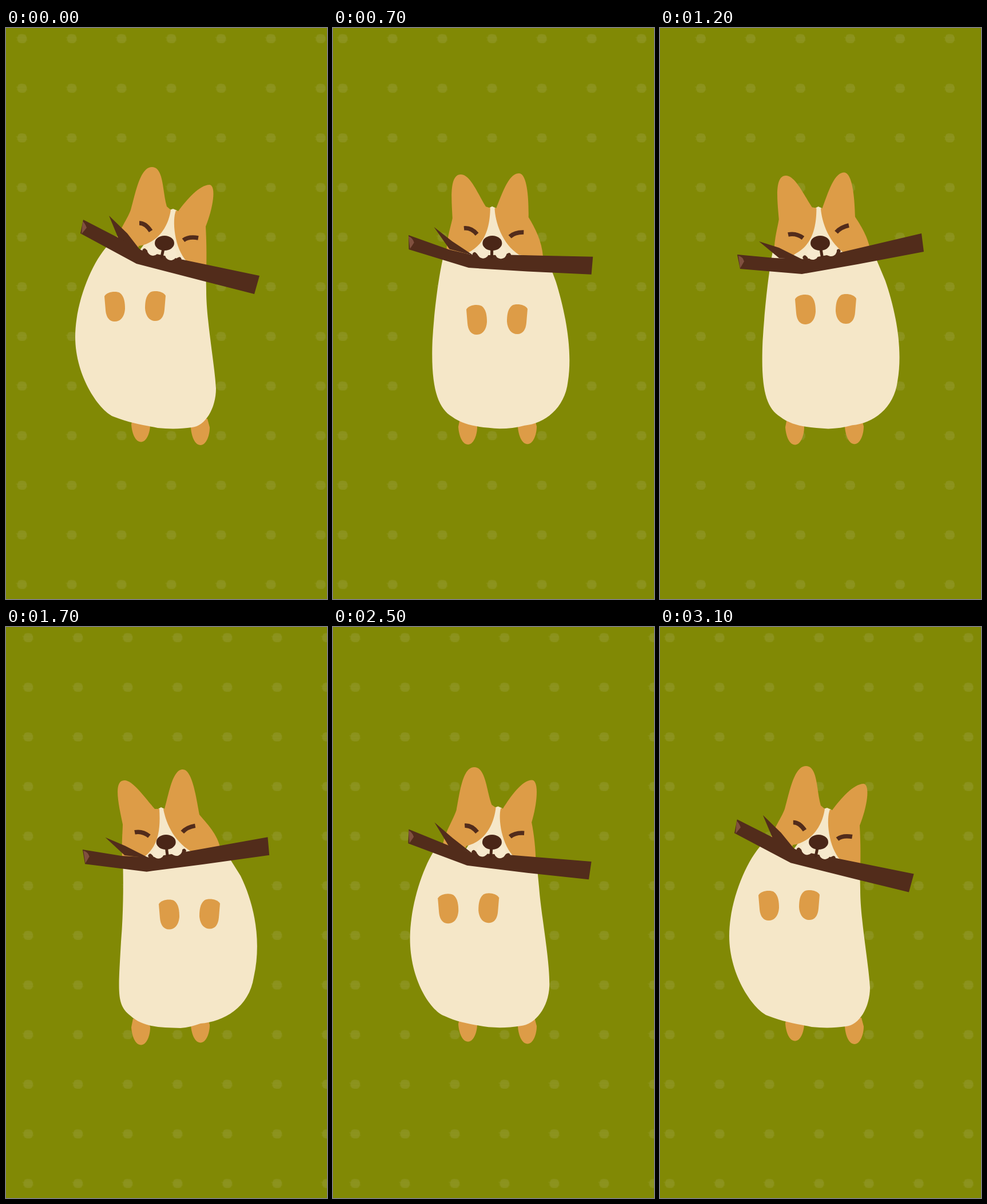
Write an HTML page that moves like this. It is 561 px wide and 998 px high and loops after 3.2 s.

```html
<!DOCTYPE html>
<html lang="en">
<head>
<meta charset="utf-8">
<title>Dancing dog</title>
<style>
  html, body { margin: 0; width: 100%; height: 100%; overflow: hidden; background: #818905; }
  svg { display: block; width: 100%; height: 100%; }
  .fur { fill: #dd9c47; }
  .cream { fill: #f5e7c8; }
  .bark { fill: #522c1b; }
  .line { fill: none; stroke: #522c1b; stroke-width: 7.5; stroke-linejoin: round; }
</style>
</head>
<body>
<svg viewBox="0 0 561 998">
  <defs>
    <pattern id="dots" width="87" height="86.73" patternUnits="userSpaceOnUse">
      <g fill="#8e9524">
        <path d="M37 37 C40 34 48 35 50 37 L52 43 L50 49 C47 52 39 51 37 49 L35 43Z" opacity=".75"/>
        <path d="M33 40h19v2h-19z M34 45h19v1.5h-19z" opacity=".4"/>
      </g>
    </pattern>
    <path id="paw" d="M-18 -18 C-14 -26 2 -28 9 -24 C17 -18 18 -6 18 4 C17 18 10 26 0 26 C-10 26 -15 18 -16 6Z"/>
    <path id="leg" d="M-14 -46 L-17 -31 C-16 -15 -10 0 0 0 C9 0 16 -15 16 -31 L12 -46Z"/>
  </defs>
  <rect width="561" height="998" fill="#818905"/>
  <rect width="561" height="998" fill="url(#dots)"/>
  <use id="legL" href="#leg" class="fur"/>
  <use id="legR" href="#leg" class="fur"/>
  <path id="body" class="cream"/>
  <use id="pawL" href="#paw" class="fur"/>
  <use id="pawR" href="#paw" class="fur"/>
  <g id="head">
    <path id="face" class="cream"/>
    <path id="earL" class="fur"/>
    <path id="earR" class="fur"/>
  </g>
  <path id="eyes" class="line"/>
  <path id="spike" class="bark"/>
  <path id="stick" class="bark"/>
  <path id="cut" fill="#80503f"/>
  <path id="corners" fill="none" stroke="#522c1b" stroke-width="7" stroke-linecap="round"/>
  <path id="jowls" fill="none" stroke="#f7e9cd" stroke-width="20" stroke-linecap="round"/>
  <path id="lip" fill="none" stroke="#4a2617" stroke-width="5" stroke-linecap="round"/>
  <ellipse id="nose" rx="17" ry="13" cy="376" fill="#4a2617"/>
</svg>
<script>
const LOOP = 3200, STEP = 100;
const $ = id => document.getElementById(id);

// Motion keys: sway of the body, tilt of face and stick, paw position
const times = [0, 700, 1200, 1700, 2200, 2800, 3100];
const sway = [0, .66, .73, 1, .35, .06, 0];
const tilt = [0, .45, 1, .89, .54, .1, .02];
const pawX = [190, 251, 254, 285, 212.5, 198, 190];
const pawY = [487, 510, 492, 502.5, 488, 497, 487];

// Poses at the extremes of sway
const swayPoses = {
  body: [
    'M178 380 C150 410 121 480 121 540 C121 610 165 672 190 680 C215 690 240 694 265 699 C285 701 305 701 325 698 C348 696 367 665 367 630 C365 590 350 510 350 460 L349 410Z',
    'M204 395 C205 430 206 490 201 550 C196 640 193 660 217 679 C240 700 270 700 305 701 C317 700 329 697 340 693 C380 690 425 665 433 612 C448 545 432 480 410 435 L388 400Z'],
  face: [
    'M286 318 L292 316 L299 319 L325 410 L225 400Z',
    'M266 318 L271 315 L277 318 L335 397 L222 407Z'],
  earL: [
    'M190 380 C192 362 212 335 218 318 C226 290 234 243 255 243 C276 243 273 285 281 312 L288 318 C283 351 263 376 232 381 L225 402Z',
    'M203 403 C202 375 204 355 204 345 C198 315 186 268 207 268 C222 268 244 300 260 318 L268 318 C270 350 268 385 238 404 L225 408Z'],
  earR: [
    'M297 319 C290 335 294 385 316 408 L350 423 C351 395 350 365 349 347 C362 315 368 276 356 274 C338 274 316 300 301 320Z',
    'M275 318 C280 345 295 378 330 396 L376 394 C372 365 355 348 338 328 C332 295 325 249 309 249 C291 249 285 290 277 318Z']
};

// Poses along tilt
const tiltPoses = {
  eyes: [
    'M233 341 Q244 341 253 355 M310 371 Q319 364 336 367',
    'M224 361 Q238 358 250 367 M308 357 Q316 348 330 345'],
  spike: [
    'M180 328 L199 374 L236 390 L212 359Z',
    'M176 350 L204 388 L246 398 L208 374Z',
    'M173 373 L208 402 L252 406 L208 384Z'],
  stick: [
    'M135 335 L195 366 L240 390 L300 403 L443 433 L434 465 L340 441 L228 412 L130 359Z',
    'M132 365 L203 389 L247 398 L306 396 L455 396 L453 427 L340 424 L238 420 L133 390Z',
    'M135 396 L200 402 L254 404 L308 394 L457 359 L461 391 L345 413 L248 430 L140 421Z'],
  cut: [
    'M134 338 Q138 341 141 349 L132 360Z',
    'M132 367 Q140 370 142 378 L135 389Z',
    'M137 398 Q145 400 147 408 L140 420Z'],
  corners: [
    'M242 389 L244 391 M303 404 L301 405',
    'M248 396 L250 398 M308 396 L306 397',
    'M253 401 L255 403 M312 390 L310 392'],
  jowls: [
    'M258 387 L257 388 M287 392 L288 396',
    'M264 390 L263 393 M293 391 L294 393',
    'M268 393 L267 395 M296 388 L299 389'],
  lip: [
    'M275 386 L272 400',
    'M278 386 L278 400',
    'M281 386 L283 398']
};

// Blends path numbers: linear for two poses, quadratic for three
function mix(poses, k) {
  const w = poses.length < 3 ? [1 - k, k]
    : [(1 - k) * (1 - 2 * k), 4 * k * (1 - k), k * (2 * k - 1)];
  const nums = poses.map(p => p.match(/\d+/g));
  let i = 0;
  return poses[0].replace(/\d+/g, () => {
    const v = w.reduce((sum, f, j) => sum + f * nums[j][i], 0);
    i++;
    return v.toFixed(2);
  });
}

// Smooth periodic curve through the keys
function curve(vals, t) {
  const n = times.length;
  const at = i => {
    const turn = Math.floor(i / n), j = i - turn * n;
    return [times[j] + turn * LOOP, vals[j]];
  };
  let i = n - 1;
  while (times[i] > t) i--;
  const slope = j => {
    const [ta, a] = at(j - 1), [tb, b] = at(j + 1);
    return (b - a) / (tb - ta);
  };
  const [t0, v0] = at(i), [t1, v1] = at(i + 1);
  const d = t1 - t0, u = (t - t0) / d, r = 1 - u;
  return v0 * r * r * (1 + 2 * u) + v1 * u * u * (3 - 2 * u)
    + d * u * r * (slope(i) * r - slope(i + 1) * u);
}

function place(id, x, y, extra = '') {
  $(id).setAttribute('transform', `translate(${x} ${y}) ${extra}`);
}

function draw(t) {
  const k = curve(sway, t), s = curve(tilt, t);
  const x = curve(pawX, t), y = curve(pawY, t);
  const shift = 28 - 43.5 + t * 4 * 87 / LOOP;
  $('dots').setAttribute('patternTransform', `translate(${shift % 87} ${19 - 43.4})`);
  for (const id in swayPoses) $(id).setAttribute('d', mix(swayPoses[id], k));
  for (const id in tiltPoses) $(id).setAttribute('d', mix(tiltPoses[id], s));
  place('head', 0, -16 * k * (1 - k));
  place('pawL', x, y);
  place('pawR', x + 71, y - 1, 'scale(-1 1)');
  place('legL', 236, 723.5 + 7 * k);
  place('legR', 340, 729 - 2.5 * k);
  $('nose').setAttribute('cx', 277 + 3 * s);
}

function frame() {
  const t = performance.now() % LOOP;
  draw(Math.floor(t / STEP) * STEP);
  requestAnimationFrame(frame);
}
frame();
</script>
</body>
</html>
```
